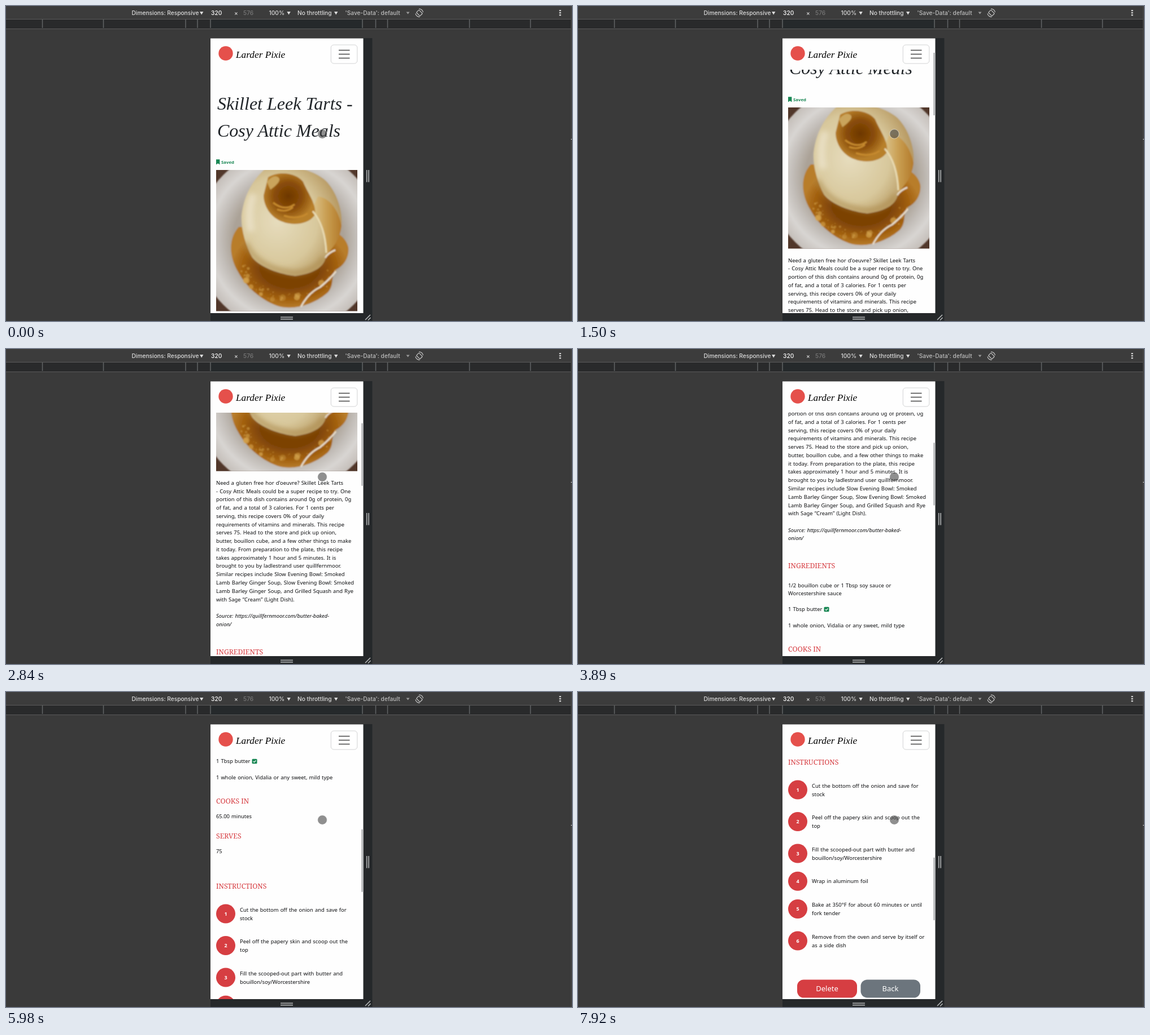
An HTML page for the animation above (8 s loop, 1002 px wide and 559 px high).

```html
<!DOCTYPE html>
<html lang="en">
<head>
<meta charset="utf-8">
<title>Recipe page in a responsive preview</title>
<style>
  html, body { margin: 0; width: 100%; height: 100%; overflow: hidden; background: #3a3a3a; }
  svg { display: block; width: 1002px; height: 559px; }
  .bar { font: 500 10.2px Inter, sans-serif; fill: #dcdcdc; }
  .dim { fill: #777; }
  .soft { fill: #bdbdbd; }
  .script { font-family: "Liberation Serif", serif; font-style: italic; fill: #212529; }
  .body { font: 500 9.4px "Noto Sans", sans-serif; word-spacing: .7px; fill: #0c0d0f; }
  .italic { font-style: italic; }
  .head { font: 12.3px "Noto Serif", serif; fill: #d63a3f; }
  .saved { font: 600 7.8px "Noto Sans", sans-serif; fill: #198754; }
  .number { font: 600 9px "Noto Sans", sans-serif; fill: #fff; text-anchor: middle; }
  .button { font: 500 13px "Noto Sans", sans-serif; fill: #fff; text-anchor: middle; }
</style>
</head>
<body>
<svg viewBox="0 0 1002 559">
  <defs>
    <clipPath id="page"><rect x="362" y="113" width="270.5" height="432"/></clipPath>
    <clipPath id="frame"><rect x="372" y="291" width="250" height="250.5"/></clipPath>
    <filter id="blur"><feGaussianBlur stdDeviation="1"/></filter>
    <filter id="haze"><feGaussianBlur stdDeviation="5"/></filter>
    <radialGradient id="bowl">
      <stop offset=".6" stop-color="#aba297"/><stop offset=".74" stop-color="#c3beb9"/>
      <stop offset=".86" stop-color="#d8d5d2"/><stop offset="1" stop-color="#c4beb9"/>
    </radialGradient>
    <radialGradient id="sauce">
      <stop offset=".5" stop-color="#7c4206"/><stop offset=".8" stop-color="#a2600e"/><stop offset="1" stop-color="#b87d2c"/>
    </radialGradient>
    <radialGradient id="onion" cx=".36" cy=".5" r=".66">
      <stop offset="0" stop-color="#e6dcbd"/><stop offset=".6" stop-color="#d8c89c"/><stop offset="1" stop-color="#b3935a"/>
    </radialGradient>
    <linearGradient id="slice">
      <stop offset="0" stop-color="#dcc690"/><stop offset=".5" stop-color="#c99e52"/><stop offset="1" stop-color="#b37a2a"/>
    </linearGradient>
    <radialGradient id="caramel" cx=".48" cy=".45">
      <stop offset="0" stop-color="#6d3703"/><stop offset=".55" stop-color="#8a4d08"/><stop offset="1" stop-color="#b8802c"/>
    </radialGradient>
  </defs>

  <!-- toolbar and ruler -->
  <rect width="1002" height="559" fill="#3a3a3a"/>
  <rect width="1002" height="23" fill="#3c3c3c"/>
  <rect y="24" width="1000" height="16" fill="#292a2b"/>
  <rect x="362" y="24" width="269" height="16" fill="#25292b"/>
  <path d="M0 23.5H1000M0 40.5H1000" stroke="#5a5a5a"/>
  <path id="ticks" stroke="#626466" stroke-width="1.5"/>
  <path d="M1000.5 0V559" stroke="#4b4b4b"/>
  <path d="M1000 236.5h2" stroke="#ccc"/>
  <g class="bar">
    <text x="222.5" y="16">Dimensions: Responsive</text>
    <text x="363" y="16" fill="#fff">320</text>
    <text x="404" y="16">×</text>
    <text x="420" y="16" class="dim">576</text>
    <text x="465.5" y="16">100%</text>
    <text x="516" y="16">No throttling</text>
    <text x="600.5" y="16" class="soft">'Save-Data': default</text>
    <path d="M343 10h6.4l-3.2 5.6zM497.4 10h6.4l-3.2 5.6zM581 10h6.4l-3.2 5.6z"/>
    <path d="M708.5 10.5h6l-3 4z" fill="#999"/>
    <path d="M979.5 7h3v2.2h-3zM979.5 11h3v2.2h-3zM979.5 15h3v2.2h-3z"/>
  </g>
  <g fill="none" stroke="#c8c8c8" stroke-width="1.2">
    <rect x="728.5" y="8" width="6.5" height="9" rx="1" transform="rotate(-45 731.7 12.3)"/>
    <path d="M731 5.2a7 7 0 0 1 7.5 6M732.5 19.3a7 7 0 0 1-7.5-6"/>
  </g>

  <!-- device edges and grips -->
  <path d="M632 57h16.5V559H362V544h270z" fill="#25282a"/>
  <path d="M638.7 291v21.5M642.2 291v21.5M486 552.2h22M486 555.6h22M636 557l9-9M641 557.5l4.5-4.5"
        stroke="#b4b6b7" stroke-width="1.6"/>

  <rect x="362" y="57.5" width="270.5" height="487.5" fill="#fefefe"/>
  <g clip-path="url(#page)">
    <g id="content">
      <g class="script" font-size="32">
        <text x="374" y="184">Skillet Leek Tarts -</text>
        <text x="374" y="231.5">Cosy Attic Meals</text>
      </g>
      <path d="M372 272.3h6.4v9.2l-3.2-2.3-3.2 2.3z" fill="#198754"/>
      <text class="saved" x="381" y="279.8">Saved</text>
      <g clip-path="url(#frame)">
        <rect x="372" y="291" width="250" height="251" fill="#51372a"/>
        <g filter="url(#blur)">
          <circle cx="500" cy="415" r="163" fill="url(#bowl)"/>
          <path d="M412 392C394 412 394 444 411 472 424 496 448 520 480 532 510 542 548 528 570 508 582 494 574 480 584 468 600 460 608 444 606 428 602 412 590 404 580 400z" fill="url(#sauce)"/>
          <g id="bubbles" fill="#d3a24c"></g>
          <path d="M460 288C490 278 542 288 566 310 588 332 598 372 593 394 589 416 574 430 567 442 564 462 548 474 512 479 486 476 450 464 436 446 424 424 416 398 417 372 421 338 436 308 460 288z" fill="url(#onion)"/>
          <path d="M541 362C555 383 567 410 567 442 580 428 592 412 594 390 588 360 572 340 552 338z" fill="url(#slice)"/>
          <path d="M464 304C482 292 514 296 526 312 534 332 552 354 546 372 534 388 508 390 490 383 468 376 456 354 456 336z" fill="url(#caramel)"/>
          <path d="M462 312q12-14 20-8t-14 22z" fill="#caa45c"/>
          <path d="M473 349q20 16 38 3M480 361q16 6 28-4M492 372q24 8 42-4" fill="none" stroke="#c68a2e" stroke-width="3"/>
          <path d="M543 364q22 26 24 74" fill="none" stroke="#e9dcb4" stroke-width="3"/>
          <path d="M522 534q13-25 34-35 18-15 28-28M565 447q5-9 18-14" fill="none" stroke="#e6dccb" stroke-width="3"/>
        </g>
        <g filter="url(#haze)" fill="none">
          <path d="M424 420Q444 466 512 474 548 470 562 446" stroke="#a98545" stroke-width="9" opacity=".6"/>
          <path d="M438 334Q426 364 434 400" stroke="#eee6cf" stroke-width="14" opacity=".7"/>
        </g>
      </g>
      <path d="M437 934.8h6q1.5 0 1.5 1.5v5.5q0 1.5-1.5 1.5h-6q-1.5 0-1.5-1.5v-5.5q0-1.5 1.5-1.5z" fill="#198754"/>
      <path d="M437.7 939l1.7 1.7 3-3.2" fill="none" stroke="#fff" stroke-width="1.1"/>
      <rect x="388" y="1546.5" width="106" height="32" rx="11.5" fill="#d63e42"/>
      <rect x="500.5" y="1546.5" width="105.5" height="32" rx="11.5" fill="#6c757d"/>
      <text class="button" x="441" y="1567">Delete</text>
      <text class="button" x="553" y="1567">Back</text>
    </g>
  </g>

  <!-- fixed page header -->
  <circle cx="389" cy="84" r="12.7" fill="#e5504b"/>
  <text class="script" x="407" y="91.5" font-size="17.3" style="fill:#000">Larder Pixie</text>
  <rect x="575.3" y="69" width="46.5" height="33" rx="5" fill="#fff" stroke="#d2d3d4"/>
  <path d="M589 78.5h19.5M589 85.5h19.5M589 92.5h19.5" stroke="#444" stroke-width="1.5"/>

  <rect id="thumb" x="629" width="3.5" height="111" fill="#bcbec0"/>
  <circle cx="560" cy="227" r="8.3" fill="#444" fill-opacity=".6" stroke="#fff" stroke-opacity=".5"/>
</svg>
<script>
const $ = id => document.getElementById(id);
const content = $("content"), thumb = $("thumb");
const LINE = 14.77;

function add(tag, attrs, text = "", parent = content) {
  const node = document.createElementNS("http://www.w3.org/2000/svg", tag);
  for (const key in attrs) node.setAttribute(key, attrs[key]);
  node.textContent = text;
  parent.append(node);
}

function lines(x, y, text, cls = "body") {
  text.split("\n").forEach((row, i) => add("text", { x, y: y + i * LINE, class: cls }, row));
}

$("ticks").setAttribute("d", [64.5, 172.5, 318, 339, 362, 631, 654.5, 675.5, 820.5, 928.5]
  .map(x => `M${x} 24V39`).join(""));

// Bubbles lie in an arc of sauce below the onion.
let seed = 7;
const random = () => (seed = seed * 16807 % 2147483647) / 2147483647;
for (let i = 0; i < 70; i++) {
  const angle = 0.3 + random() * 2.5, reach = 0.8 + random() * 0.17;
  add("circle", {
    cx: 500 + 98 * reach * Math.cos(angle), cy: 432 + 98 * reach * Math.sin(angle),
    r: 0.8 + 5 * random() ** 4, opacity: 0.35 + 0.4 * random(),
  }, "", $("bubbles"));
}

lines(372, 565.5, `Need a gluten free hor d'oeuvre? Skillet Leek Tarts
- Cosy Attic Meals could be a super recipe to try. One
portion of this dish contains around 0g of protein, 0g
of fat, and a total of 3 calories. For 1 cents per
serving, this recipe covers 0% of your daily
requirements of vitamins and minerals. This recipe
serves 75. Head to the store and pick up onion,
butter, bouillon cube, and a few other things to make
it today. From preparation to the plate, this recipe
takes approximately 1 hour and 5 minutes. It is
brought to you by ladlestrand user quillfernmoor.
Similar recipes include Slow Evening Bowl: Smoked
Lamb Barley Ginger Soup, Slow Evening Bowl: Smoked
Lamb Barley Ginger Soup, and Grilled Squash and Rye
with Sage “Cream” (Light Dish).`);
lines(372, 801.7, "Source: https://quillfernmoor.com/butter-baked-\nonion/", "body italic");

lines(372, 866.3, "INGREDIENTS", "head");
lines(372, 899.5, "1/2 bouillon cube or 1 Tbsp soy sauce or\nWorcestershire sauce");
lines(372, 942.3, "1 Tbsp butter");
lines(372, 971, "1 whole onion, Vidalia or any sweet, mild type");
lines(372, 1013.5, "COOKS IN", "head");
lines(372, 1040, "65.00 minutes");
lines(372, 1076, "SERVES", "head");
lines(372, 1102, "75");
lines(372, 1164.7, "INSTRUCTIONS", "head");

[
  [1209.5, "Cut the bottom off the onion and save for\nstock"],
  [1266, "Peel off the papery skin and scoop out the\ntop"],
  [1322.5, "Fill the scooped-out part with butter and\nbouillon/soy/Worcestershire"],
  [1371.8, "Wrap in aluminum foil"],
  [1421, "Bake at 350°F for about 60 minutes or until\nfork tender"],
  [1477.5, "Remove from the oven and serve by itself or\nas a side dish"],
].forEach(([cy, text], i) => {
  add("circle", { cx: 389, cy, r: 17, fill: "#d63e42" });
  add("text", { x: 389, y: cy + 3.2, class: "number" }, i + 1);
  lines(414, cy + (text.includes("\n") ? -3.7 : 3.3), text);
});

// The page repaints in bursts: [first ms, last ms, repaints].
const bursts = [[150, 1050, 7], [1200, 1500, 3], [1800, 2840, 8], [3140, 4040, 7], [4190, 4190, 1],
  [4490, 4930, 4], [5230, 5680, 4], [5980, 6580, 5], [6880, 7470, 5], [7770, 7920, 2]];
const repaints = [0, ...bursts.flatMap(([from, to, n]) =>
  Array.from({ length: n }, (_, i) => from + (to - from) * i / Math.max(1, n - 1)))];

// Scroll distance at key times, linear in between.
const keys = [[0, 0], [600, 31], [1050, 46], [1500, 111], [2840, 324.7], [3890, 477], [4190, 499],
  [5980, 816], [6580, 946], [6880, 968], [7470, 1015], [7920, 1036]];

function scrollAt(time) {
  const i = Math.max(1, keys.findIndex(([t]) => t >= time));
  const [t0, s0] = keys[i - 1], [t1, s1] = keys[i];
  return s0 + (s1 - s0) * (time - t0) / (t1 - t0);
}

function draw() {
  const time = performance.now() % 8000;
  const painted = repaints.findLast(t => t <= time + 0.5);
  const scroll = scrollAt(painted);
  content.setAttribute("transform", `translate(0 ${-scroll})`);
  thumb.setAttribute("y", 57.7 + scroll * 0.228);
  thumb.setAttribute("visibility", painted ? "visible" : "hidden");
  requestAnimationFrame(draw);
}
draw();
</script>
</body>
</html>
```
